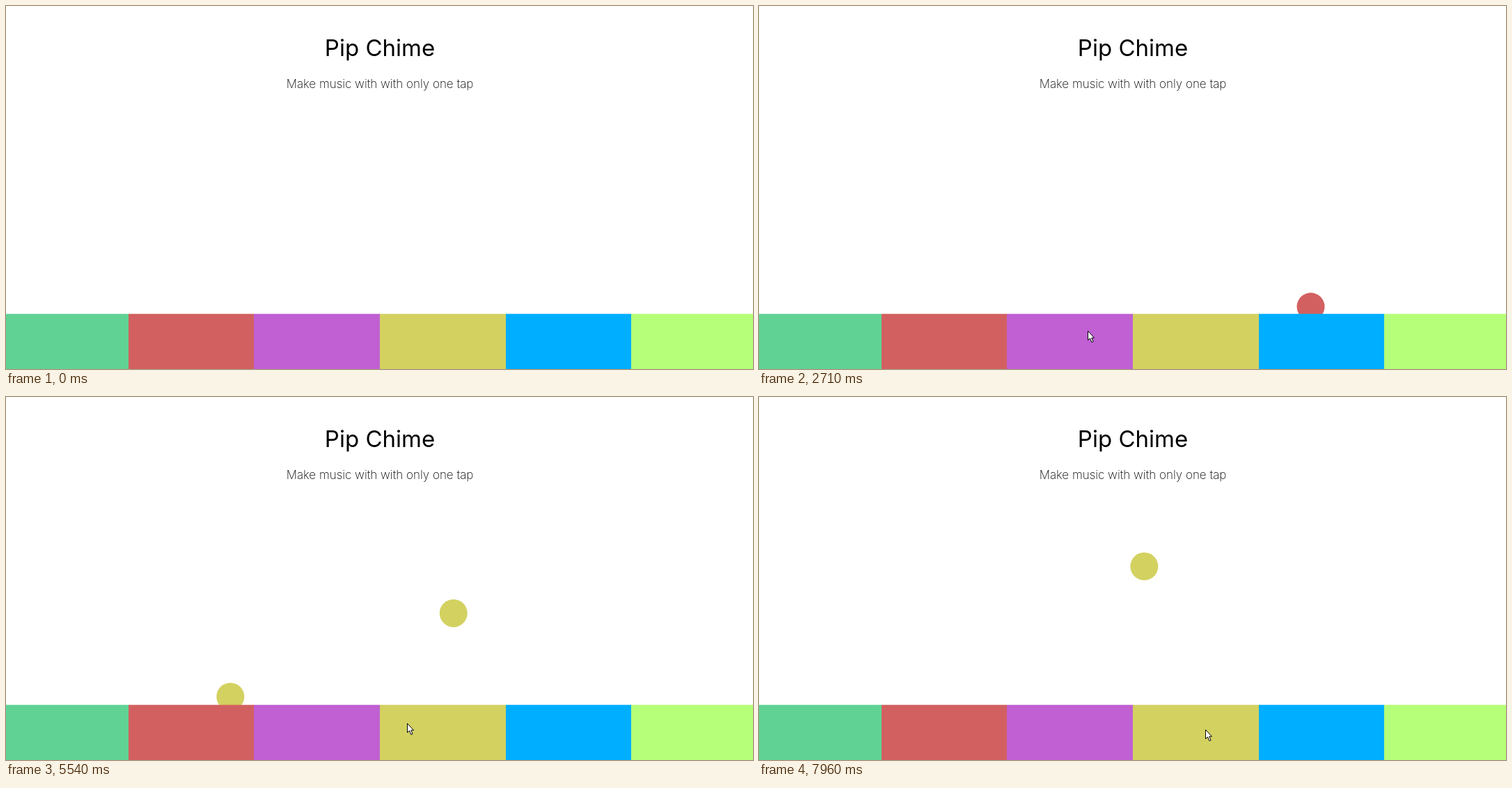
These frames come from a looping animation (1073x522 px, 8 s). An HTML page with a canvas:

```html
<!DOCTYPE html>
<html lang="en">
<head>
<meta charset="utf-8">
<title>Pip Chime</title>
<style>
  html, body { margin: 0; width: 100%; height: 100%; overflow: hidden; background: #fff; }
  svg, canvas { position: absolute; left: 0; top: 0; display: block; }
  text { font-family: Inter, Lato, sans-serif; text-anchor: middle; }
  .title { font-size: 33px; font-weight: 400; fill: #000; }
  .tagline { font-size: 17px; font-weight: 200; fill: #000; }
</style>
</head>
<body>
<svg width="1073" height="522">
  <text class="title" x="537" y="72">Pip Chime</text>
  <text class="tagline" x="537" y="118">Make music with with only one tap</text>
</svg>
<canvas id="stage" width="1073" height="522"></canvas>
<script>
const W = 1073, H = 522, LOOP = 8000, TICK = 77;
const PAD_TOP = 442.7, PAD_LEFT = -5, PAD_WIDTH = (W + 11) / 6;
const RADIUS = 20, HALF_JUMP = 500, TRAVEL = 300;
const ctx = document.getElementById('stage').getContext('2d');

const pads = ['#60d394', '#d36060', '#c060d3', '#d3d160', '#00aeff', '#b6ff78'];

// Tap times; the pad is the one under the pointer
const taps = [1298, 1976, 3215, 3265, 4873, 5372, 6678, 7496];

// Pointer moves: departure time and where it goes
const moves = [
  { at: 380, x: 375, y: 466 },
  { at: 385, x: 324, y: 479 },
  { at: 650, x: 81, y: 465 },
  { at: 1500, x: 225, y: 473 },
  { at: 2500, x: 476, y: 467 },
  { at: 4270, x: 576, y: 469 },
  { at: 5800, x: 695, y: 447 },
  { at: 6090, x: 641, y: 478 }
];

const lerp = (a, b, p) => a + (b - a) * p;
const easeOut = p => 1 - (1 - Math.min(p, 1)) ** 4;

// CSS "ease": cubic-bezier(.25, .1, .25, 1)
function ease(x) {
  const bez = (s, a, b) => 3 * (1 - s) * s * ((1 - s) * a + s * b) + s ** 3;
  let lo = 0, hi = 1;
  for (let i = 0; i < 24; i++) {
    const mid = (lo + hi) / 2;
    if (bez(mid, 0.25, 0.25) < x) lo = mid; else hi = mid;
  }
  return bez(lo, 0.1, 1);
}

function pointerAt(t) {
  const i = moves.findLastIndex(m => m.at <= t);
  if (i < 0) return null;
  const to = moves[i], from = moves[i - 1] || to;
  const p = easeOut((t - to.at) / TRAVEL);
  return { x: Math.round(lerp(from.x, to.x, p)), y: Math.round(lerp(from.y, to.y, p)) };
}

const padEdge = i => Math.round(PAD_LEFT + i * PAD_WIDTH);
const padUnder = x => Math.floor((x - PAD_LEFT) / PAD_WIDTH);

// Jump from 20% to 50% of the width at mid height, then down to 80%
function drawBubble(age, color) {
  if (age < 0 || age > 2 * HALF_JUMP) return;
  const rising = age < HALF_JUMP;
  const p = ease((age % HALF_JUMP) / HALF_JUMP);
  const left = W * (rising ? lerp(0.2, 0.5, p) : lerp(0.5, 0.8, p));
  const bottom = H / 2 * (rising ? p : 1 - p);
  ctx.fillStyle = color;
  ctx.beginPath();
  ctx.arc(left + RADIUS, H - bottom - RADIUS, RADIUS, 0, Math.PI * 2);
  ctx.fill();
}

function drawPads() {
  pads.forEach((color, i) => {
    ctx.fillStyle = color;
    ctx.fillRect(padEdge(i), PAD_TOP, padEdge(i + 1) - padEdge(i), H - PAD_TOP);
  });
}

function drawPointer({ x, y }) {
  ctx.save();
  ctx.translate(x + 0.5, y + 0.5);
  const arrow = new Path2D('M0 0V13L3 10.4L5.4 16L7.6 15L5.2 9.7H9Z');
  ctx.fillStyle = '#fff';
  ctx.strokeStyle = '#000';
  ctx.fill(arrow);
  ctx.stroke(arrow);
  ctx.restore();
}

function draw(now) {
  // The picture refreshes in fixed ticks
  const time = now % LOOP;
  const t = time - time % TICK;
  ctx.clearRect(0, 0, W, H);
  for (const start of taps) {
    drawBubble(t - start, pads[padUnder(pointerAt(start).x)]);
  }
  drawPads();
  const pointer = pointerAt(t);
  if (pointer) drawPointer(pointer);
}

let origin = null;
function frame(now) {
  origin ??= now;
  draw(now - origin);
  requestAnimationFrame(frame);
}
draw(0);
requestAnimationFrame(frame);
</script>
</body>
</html>
```
